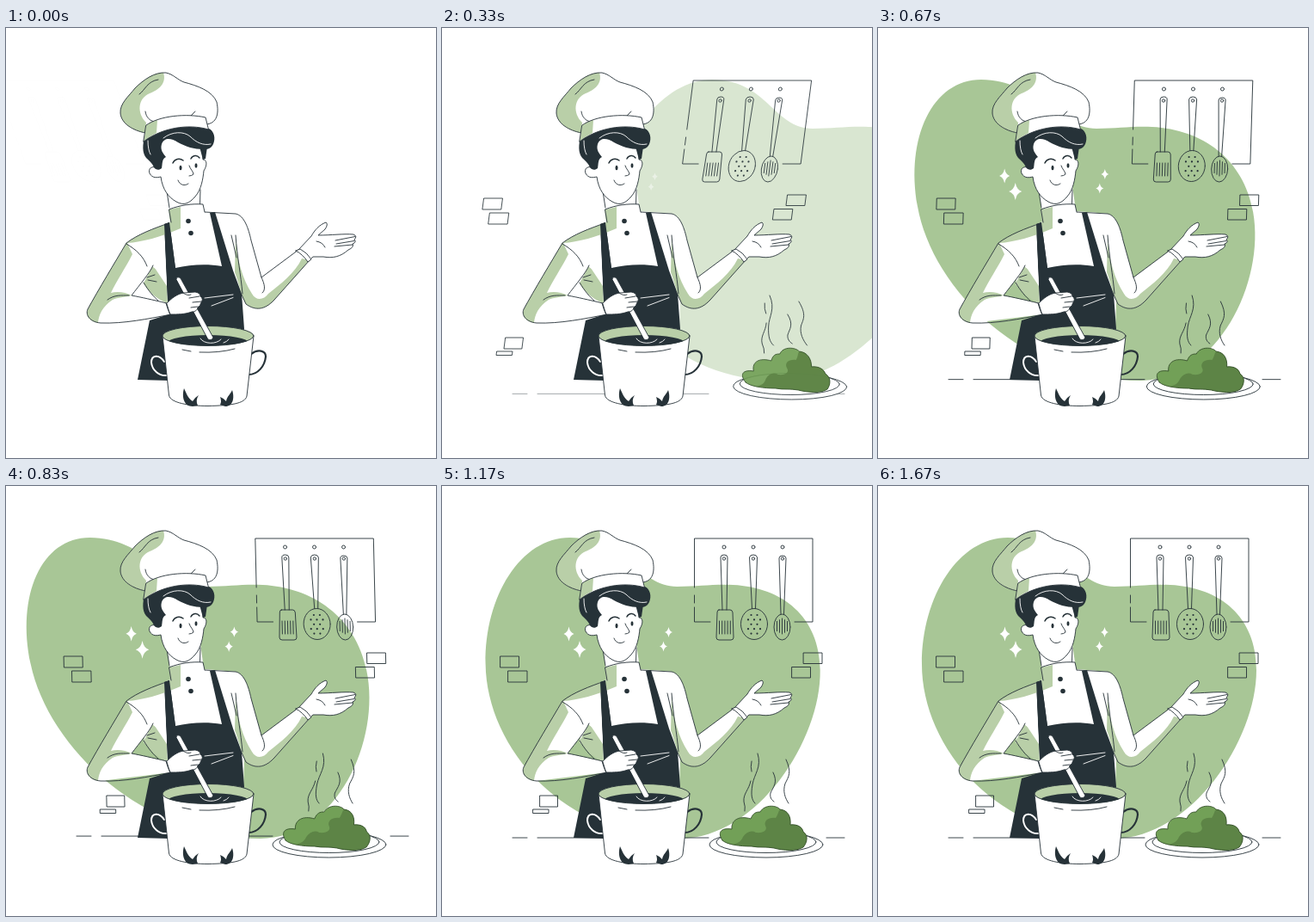
Write an HTML page with a canvas that moves like this. It is 500x500 px and loops after 1710 ms.

```html
<!DOCTYPE html>
<html lang="en">
<head>
<meta charset="utf-8">
<title>Cooking chef</title>
<style>
  html, body { margin: 0; width: 100%; height: 100%; overflow: hidden; background: #fff; }
  canvas { display: block; width: 500px; height: 500px; }
</style>
</head>
<body>
<canvas id="stage" width="500" height="500"></canvas>
<script>
const ctx = document.getElementById('stage').getContext('2d');
const INK = '#263238', WHITE = '#fff', SAGE = '#b9cfa8', BLOB = '#a8c696';
const LOOP = 1710, FPS = 24, LEAD = 28;
const tan = deg => Math.tan(deg * Math.PI / 180);
const mix = (a, b, p) => a + (b - a) * p;

// cubic-bezier(.36, -.01, .5, 1.38)
function ease(x) {
  if (x <= 0) return 0;
  if (x >= 1) return 1;
  const bez = (a, b, t) => 3 * (1 - t) ** 2 * t * a + 3 * (1 - t) * t * t * b + t ** 3;
  let lo = 0, hi = 1;
  for (let i = 0; i < 24; i++) {
    const mid = (lo + hi) / 2;
    if (bez(.36, .5, mid) < x) lo = mid; else hi = mid;
  }
  return bez(-.01, 1.38, lo);
}

function paint(d, fill, stroke = INK, width = .9) {
  const path = new Path2D(d);
  if (fill) { ctx.fillStyle = fill; ctx.fill(path); }
  if (stroke) { ctx.strokeStyle = stroke; ctx.lineWidth = width; ctx.stroke(path); }
}
const fillShape = (d, color) => paint(d, color, null);
const line = (d, color, width) => paint(d, null, color, width);

function oval(x, y, rx, ry, fill, stroke = INK, width = .9) {
  ctx.beginPath();
  ctx.ellipse(x, y, rx, ry, 0, 0, Math.PI * 2);
  if (fill) { ctx.fillStyle = fill; ctx.fill(); }
  if (stroke) { ctx.strokeStyle = stroke; ctx.lineWidth = width; ctx.stroke(); }
}

function group(alpha, transform, draw) {
  ctx.save();
  ctx.globalAlpha = Math.max(0, Math.min(1, alpha));
  ctx.transform(...transform);
  draw();
  ctx.restore();
}

// Slides in from one side (1 right, -1 left) while leaning, then rocks upright.
function dashIn(time, duration, side, centerY, draw) {
  const u = time / duration;
  let shift = 0, lean, alpha = 1;
  if (u < .6) {
    alpha = ease(u / .6);
    shift = 250 * (1 - alpha);
    lean = mix(-tan(20), tan(10), alpha);
  } else if (u < .8) lean = mix(tan(10), -tan(2), ease((u - .6) / .2));
  else lean = mix(-tan(2), 0, ease((u - .8) / .2));
  group(alpha, [1, 0, side * lean, 1, side * (shift - lean * centerY), 0], draw);
}

function drawBlob() {
  fillShape('M51 207C51 128 94 60 151 60C215 60 230 117 275 117C300 117 316 114 340 115' +
    'C398 118 440 152 440 214C440 296 364 409 275 410C140 410 51 305 51 207Z', BLOB);
}

function drawWall() {
  line('M293.5 118V61H431V158H410M293.5 127V136M293.5 141V158H312');
  for (const x of [328, 362, 396]) {
    oval(x, 71, 2, 2);
    oval(x, 84.5, 1.7, 1.7);
  }
  line('M326 144L324 83Q324 80 328 80Q332 80 332 83L331 144' +
    'M322 144H335Q337.5 144 338 147L339 176Q339 179 336 179H322Q319 179 319 176L320 147Q320 144 322 144Z');
  for (let x = 322.5; x < 337; x += 3.2) line(`M${x} 157V172`);

  line('M360.5 142.5L357.5 83Q358 80 362 80Q366 80 366.5 83L364.5 142.5');
  oval(363, 160.5, 15.5, 18);
  [2, 3, 2, 3, 2].forEach((count, row) => {
    for (let i = 0; i < count; i++) oval(363 + (i - (count - 1) / 2) * 7, 150 + row * 5.4, 1.1, 1.1, INK, null);
  });

  line('M394 149L392 84Q392 81 396 81Q400 81 400 84L397.5 149');
  oval(395.5, 164, 9.5, 15);
  for (let i = -2; i <= 2; i++) {
    const h = 9 - Math.abs(i) * 1.7;
    line(`M${395.5 + i * 3} ${163 - h}V${163 + h}`);
  }

  const bricks = [[68, 198, 21.5, 13], [77, 215, 22, 13], [114, 360, 20.5, 13],
    [106, 376, 18, 4.5], [420.5, 194, 21.5, 12.5], [407, 210.5, 21.5, 12.5]];
  for (const [x, y, w, h] of bricks) line(`M${x} ${y}h${w}v${h}h${-w}Z`);
}

function drawTable() {
  line('M82 409H99M111 409H310M447 409H468');
}

function drawSparkles() {
  for (const [x, y, w, h] of [[147.5, 172, 6, 8.5], [160, 190, 7.5, 10], [263.5, 170, 4.5, 6], [257.5, 186.5, 4.5, 6]]) {
    const a = w * .2, b = h * .2;
    fillShape(`M${x} ${y - h}Q${x + a} ${y - b} ${x + w} ${y}Q${x + a} ${y + b} ${x} ${y + h}` +
      `Q${x - a} ${y + b} ${x - w} ${y}Q${x - a} ${y - b} ${x} ${y - h}Z`, WHITE);
  }
}

function drawDish() {
  oval(377, 417, 66, 15, WHITE);
  oval(377, 414, 58, 12.5, WHITE);
  const food = 'M326 412C320 403 324 397 337 399C336 388 346 383 359 387C362 380 365 379 370 379' +
    'C375 370 389 371 393 376C402 377 406 384 405 394C414 393 419 397 420 402C426 406 425 414 420 420' +
    'C412 425 397 424 386 421C376 419 370 421 360 419C346 419 331 417 326 412Z';
  fillShape(food, '#72a057');
  fillShape('M393 376C402 377 406 384 405 394C414 393 419 397 420 402C426 406 425 414 420 420' +
    'C412 425 397 424 386 421C376 419 370 421 360 419C352 419 344 418 338 416C344 416 348 413 350 408' +
    'C354 402 360 400 365 403C374 404 379 400 376 395C374 389 380 385 388 386C391 382 391 378 393 376Z', '#5d8446');
  line(food, '#35502b');
  line('M400 318C407 333 403 338 399 346C396 355 399 363 403 369');
  line('M385 333C391 345 385 350 382 357C381 362 383 365 386 367');
  line('M367 311C372 327 363 335 361 347C359 359 360 365 364 369');
  line('M360 320Q358.500 327 360 332M359 343C357 353 350 358 351 367Q353 373 352 378');
}

function drawBody() {
  // torso and far sleeve
  fillShape('M189 226L231 213L268 216L280 240L276 350H190L184 318L160 298L165 270L140 250Z', WHITE);
  fillShape('M243 214L267 216C277 218 282 233 285 247L297 290L340 258L353 270L312 316C301 328 290 329 279 321' +
    'C273 311 272 298 266 284Z', WHITE);
  fillShape('M267 243C268 268 275 292 286 309C291 318 300 316 305 309C319 298 336 285 344 268L353 270' +
    'L312 316C301 328 290 329 279 321C273 310 271 297 266 284Z', SAGE);
  line('M262 241L268 267M267 241C269 268 273 286 275 309M297 290C301 298 302 305 298 308');
  line('M231 214L267 216C277 218 282 233 285 247L297 290L340 258M353 270L312 316C301 328 290 329 279 321L274 310');

  // open hand
  paint('M340 258L355 242C359 235 364 229 372 226Q375 228 371 234L363 241C378 241 393 239 404 240' +
    'Q409 242 405 246Q408 249 403 251Q405 255 398 258C389 266 380 268 369 266L357 266L353 270Z', WHITE);
  line('M383 247L406 242.500M384 251L405 247.500M382 254L403 252M361 248Q368 249 371 255');
  paint('M337 259L342 257Q350 261 355 269L351 272Q345 263 337 259Z', WHITE);

  // shaded side
  fillShape('M170 276C166 287 162 292 160 297C167 308 176 316 188 320L187 300C184 290 178 282 171 278Z', SAGE);
  line('M160 296C166 306 172 313 177 317M164 290L173 287M165 293L175 295');

  // apron
  fillShape('M184 228L190 226L197 279C214 275 234 274 251 277L237 215L243 214L264 282L274 309L277 350' +
    'L270 380L190 410L153 409L167 340L189 333L187 300Z', INK);
  line('M231 314L264 310M239 323L264 313.500', WHITE);
}

function drawNearArm() {
  const sleeve = 'M189 227C172 233 153 240 140 250C127 272 107 305 95 327C92 334 98 342 110 343' +
    'C137 344 166 338 192 333L187 320C170 316 157 313 146 311C155 299 168 284 171 276';
  fillShape('M140 250L184 236L187 300L171 276C168 284 155 299 146 311L187 320L192 333L110 343Q92 342 95 327Z', WHITE);
  fillShape('M189 227C172 233 153 240 140 250C127 272 107 305 95 327C92 334 97 341 107 343' +
    'C108 333 112 324 124 316C130 313 138 313 146 311C139 307 129 306 122 308C129 293 139 279 147 263' +
    'L141 250C158 249 180 243 203 233L203 209L189 211L191 226Z', SAGE);
  line(sleeve);
  line('M140 251C152 258 160 266 164 277M118 316C126 310 134 311 143 311');

  // strap over the shoulder shade
  fillShape('M184 228L190 226L197 279L197 312H188L187 290Z', INK);
}

function drawHead() {
  // neck and face
  fillShape('M186 180L190 210L229 205L226 184Z', WHITE);
  line('M187 190L190 209M226 188L225.500 205');
  paint('M177 163C169 159 165 164 167 169C170 175 176 174 180 173C182 188 189 197 198 202' +
    'C207 207 213 204 220 196C227 188 229 176 230 166C234 160 234 153 229 153L229 130L180 125Z', WHITE);
  fillShape('M225 138L234 138L232 152L229 153Z', INK);
  oval(203, 162.5, 1.5, 2.8, INK, null);
  oval(221, 160, 1.5, 2.8, INK, null);
  line('M194 157C196 152 202 151 206 154M215 152C217 148 222 147 225 151', INK, 1.5);
  line('M213 160C214 164 218 167 218 170Q216 172 213 172M200 177C202 183 208 184 212 181');

  // collar
  fillShape('M190 211C202 206 216 204 229 205L231 214L231 218Q208 222 192 227Z', WHITE);
  fillShape('M190 211L203 208L203 229Q199 233 192 235Z', SAGE);
  line('M192 226L189.500 211C202 206 216 204 229 205L231 214');
  oval(212, 224.5, 2.8, 2.8, INK, null);
  oval(215, 238.5, 2.8, 2.8, INK, null);

  // hair
  fillShape('M161 127C176 116 213 112 236 117C242 120 244 128 241 135C238 141 234 141 229 141' +
    'C219 141 209 138 200 133C192 128 184 127 181 135C179 142 183 146 186 150C181 152 182 158 181 163' +
    'C178 166 174 165 172 162C170 157 166 154 163 151C158 145 159 135 161 127Z', INK);
  line('M183 128C193 120 207 120 214 126C221 133 229 137 238 135M165 131Q165 142 168 147', WHITE);

  // hat
  const dome = 'M162 122C147 119 134 111 133 99C132 88 143 79 150 70C160 60 173 51 186 52' +
    'C195 54 199 60 207 63C222 67 240 73 245 86C248 100 245 111 233 112';
  fillShape(dome + 'L200 103L163 113Z', WHITE);
  fillShape('M162 122C147 119 134 111 133 99C132 88 143 79 150 70C160 60 173 51 183 52' +
    'C187 64 178 72 167 76C153 82 152 99 163 110Z', SAGE);
  line(dome);
  line('M155 77C162 72 164 62 177 60M213 104L220 97M162 97C163 104 167 108 173 109');
  const band = 'M163 113C178 102 210 99 232 104L235.500 118C212 111 181 116 160 132Z';
  fillShape(band, WHITE);
  fillShape('M163 113Q169 109 176 107L175 122Q167 126 160 132Z', SAGE);
  line(band);
}

function drawPot() {
  const handle = 'M187 404C178 405 170 398 169 389C169 380 178 379 184 388';
  line(handle, INK, 4);
  line(handle, WHITE, 2);
  line('M285 379C293 373 302 375 302 382C301 393 293 403 282 403', INK, 2.2);

  paint('M182 358L189.500 427C191 436 213 439.500 235 439.500C260 439 278 437 280 428L288 358Z', WHITE);
  oval(235, 358, 53, 11.5, SAGE);
  ctx.save();
  ctx.beginPath();
  ctx.ellipse(235, 358, 53, 11.5, 0, 0, Math.PI * 2);
  ctx.clip();
  oval(235, 366, 47, 9, INK, null);
  ctx.restore();
  line('M226 361C230 368 245 368 250 362M253 366Q257 365 259 362', WHITE);
  line('M205 374L215 376M225 377Q248 378 266 373');

  // ladle and stirring hand
  paint('M198 292Q199 288 203 291L241 360Q239 364 235 362Z', WHITE);
  paint('M187 320C193 314 199 309 207 308L220 307Q226 308 226 312Q230 315 227 319Q226 323 223 325' +
    'Q222 330 216 330C208 333 200 333 191 333Z', WHITE);
  line('M213 314L225 312M217 319L227 318M215 325L223 324M206 308Q211 312 215 310');
  line('M186 320Q188 328 192 335');

  // flames
  fillShape('M207 419C204 429 207 440 217 440L223 439Q220 433 224 427Q219 430 217 434C211 430 210 425 207 419Z', INK);
  fillShape('M263 421C266 430 264 440 255 440L249 438Q251 434 249 429Q254 431 256 434C257 428 261 426 263 421Z', INK);
}

function drawScenery(time) {
  const rise = ease(time / 1000);
  const zoom = mix(.5, 1, rise);
  dashIn(time, 1700, 1, 235, drawBlob);
  dashIn(time, 1000, -1, 220, drawWall);
  group(rise, [1, 0, 0, 1, 0, 30 * (1 - rise)], drawTable);
  group(rise, [zoom, 0, 0, zoom, 205 * (1 - zoom), 180 * (1 - zoom)], drawSparkles);
  dashIn(time, 1000, 1, 372, drawDish);
}

let start;
function render(now) {
  start ??= now;
  const step = Math.floor(((now - start) % LOOP + 5) * FPS / 1000);
  ctx.fillStyle = WHITE;
  ctx.fillRect(0, 0, 500, 500);
  ctx.lineCap = ctx.lineJoin = 'round';
  drawScenery(step * 1000 / FPS + LEAD);
  drawBody();
  drawNearArm();
  drawHead();
  drawPot();
  requestAnimationFrame(render);
}
requestAnimationFrame(render);
</script>
</body>
</html>
```
